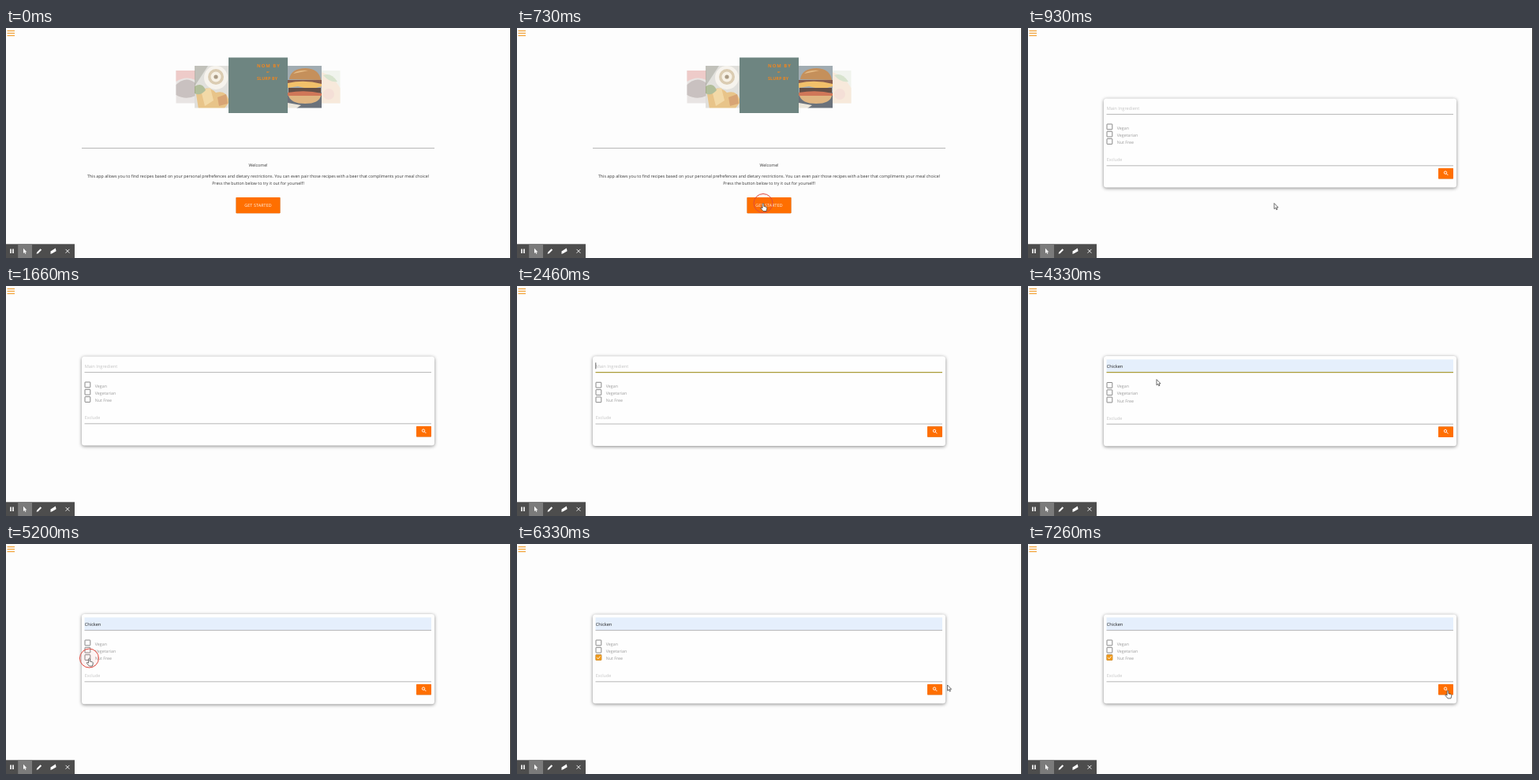
Write an HTML page that moves like this. It is 640 by 292 pixels and loops after 8000 ms.

```html
<!DOCTYPE html>
<html lang="en">
<head>
<meta charset="utf-8">
<title>Recipe finder</title>
<style>
html, body { margin: 0; width: 100%; height: 100%; overflow: hidden; background: #fdfdfd; }
svg { display: block; width: 100vw; height: 100vh; }
text { font: 5.295px "Open Sans", "Noto Sans", sans-serif; fill: #333; text-rendering: geometricPrecision; }
.mid { text-anchor: middle; }
.grey { fill: #999; }
.hint { fill: #c4c4c4; font-size: 5.65px; }
.btn { fill: #ff6f00; filter: drop-shadow(0 .6px .6px #0005); }
.card { fill: #fefefe; filter: drop-shadow(0 1.2px 2px #0007); }
.box { fill: #fefefe; stroke: #6a6a6a; stroke-width: .8; }
.brand { font-weight: 700; fill: #f2861e; }
</style>
</head>
<body>
<svg viewBox="0 0 640 292" preserveAspectRatio="none">
  <defs>
    <clipPath id="cl"><rect x="239" y="48" width="43" height="53.5"/></clipPath>
    <clipPath id="cr"><rect x="357" y="48" width="43" height="53.5"/></clipPath>
  </defs>
  <rect width="640" height="292" fill="#fdfdfd"/>
  <path d="M1.5 3.6H11M1.5 6.6H11M1.5 9.6H11" stroke="#f2a33a" stroke-width="1.2"/>

  <g id="home">
    <g opacity=".4">
      <rect x="215.5" y="54" width="24" height="41.5" fill="#c9c1bd"/>
      <path d="M215.5 54H240V66Q228 60 215.5 68Z" fill="#d8837c"/>
      <path d="M215.5 72Q228 60 240 70V86Q228 92 215.5 85Z" fill="#7d6a66"/>
      <rect x="400" y="54" width="23.5" height="41.5" fill="#dfe5d6"/>
      <path d="M400 56Q414 60 423.5 76V95.5H400Z" fill="#f0cdaa"/>
      <path d="M402 60Q412 56 420 68Q411 70 402 60Z" fill="#9fbd88"/>
      <circle cx="409" cy="84" r="7" fill="#e9b3a0"/>
    </g>
    <g opacity=".72" clip-path="url(#cl)">
      <rect x="239" y="48" width="43" height="54" fill="#d6d5cf"/>
      <path d="M239 48H256L239 74Z" fill="#a9aaa0"/>
      <circle cx="266" cy="63" r="15" fill="#f3efe6"/>
      <circle cx="266" cy="62" r="10" fill="#cdb995"/>
      <circle cx="266" cy="62" r="6.5" fill="#f4ecdc"/>
      <circle cx="266" cy="62" r="2.6" fill="#8a7556"/>
      <path d="M241 84Q254 70 266 82Q280 78 283 94L276 103H244Z" fill="#e0ad5c"/>
      <path d="M247 79L259 76L263 92L252 99Z" fill="#eecb86"/>
      <path d="M239 74Q249 68 253 79Q246 87 239 83Z" fill="#93a573"/>
      <path d="M268 88L279 84L281 96L270 99Z" fill="#c98240"/>
    </g>
    <g opacity=".82" clip-path="url(#cr)">
      <rect x="357" y="48" width="43" height="54" fill="#8d9aa2"/>
      <rect x="357" y="82" width="43" height="20" fill="#4b545e"/>
      <path d="M359 65Q361 51 380 51Q397 52 399 66Z" fill="#b97838"/>
      <path d="M364 58Q370 53 383 54Q374 56 364 58Z" fill="#e0ac69"/>
      <path d="M357 66H400V71H357Z" fill="#6d3b29"/>
      <path d="M357 70Q378 65 400 71V74L386 78L370 74L357 76Z" fill="#f0b24a"/>
      <path d="M358 76H399V82H358Z" fill="#43291f"/>
      <path d="M357 82Q380 78 400 83V86H357Z" fill="#c65934"/>
      <path d="M358 86H399Q397 96 379 96Q361 96 358 86Z" fill="#d9a566"/>
      <path d="M357 95L374 98L368 102H357Z" fill="#e7e1d4"/>
    </g>
    <rect x="282" y="37.5" width="75" height="70.5" fill="#6e8581"/>
    <text class="brand" x="318" y="50.3" style="font-size:5.8px;letter-spacing:1px">NOM BY</text>
    <text class="brand mid" x="332" y="57.4" style="font-size:3.6px">or</text>
    <text class="brand" x="318" y="66.3" style="font-size:5.4px;letter-spacing:.1px">SLURP BY</text>

    <path d="M96 152.6H543" stroke="#b4b4b4"/>
    <text class="mid" x="319.5" y="176.3">Welcome!</text>
    <text class="mid" x="319.5" y="190.4">This app allows you to find recipes based on your personal prefrefences and dietary restrictions. You can even pair those recipes with a beer that compliments your meal choice!</text>
    <text class="mid" x="319.5" y="198.7">Press the button below to try it out for yourself!</text>
    <rect class="btn" x="291.5" y="215" width="56" height="20.2" rx=".8"/>
    <text class="mid" x="319.5" y="227.1" style="fill:#fff;letter-spacing:.15px">GET STARTED</text>
  </g>

  <g id="form">
    <rect id="card" class="card" x="96" width="447" rx="3.5"/>
    <rect id="fill" x="99.5" y="93.3" width="439.5" height="16.2" fill="#e5effc"/>
    <path id="line" d="M99.5 109.6H539"/>
    <text id="hint" class="hint" x="99.7" y="103.6">Main Ingredient</text>
    <text id="value" x="99.7" y="103.7" style="fill:#222">Chicken</text>
    <path id="caret" d="M0 97.3V105.3" stroke="#222" stroke-width=".7"/>
    <g id="body">
      <g id="checks"></g>
      <g id="tick">
        <rect x="99.6" y="140.4" width="7.6" height="7.4" rx=".7" fill="#f09a1c"/>
        <path id="mark" d="M101.3 144.2L102.8 145.8L105.6 142.5" fill="none" stroke="#fff" stroke-width=".9"/>
      </g>
      <text class="hint" x="99.7" y="169" style="font-size:5.5px">Exclude</text>
      <path d="M99.5 174.8H539" stroke="#a5a5a5" stroke-width=".8"/>
      <rect class="btn" x="520" y="178" width="19" height="13.4" rx=".7"/>
      <g fill="none" stroke="#fff" stroke-width=".9">
        <circle cx="529" cy="183.6" r="1.7"/>
        <path d="M530.3 184.9L532.4 187"/>
      </g>
    </g>
  </g>

  <rect x="639" width="1" height="292" fill="#222"/>
  <g id="bar">
    <rect y="274.3" width="87" height="17.7" fill="#4d4d4d"/>
    <rect x="15.2" y="274.3" width="17.8" height="17.7" fill="#7b7b7b"/>
    <g fill="#fff">
      <path d="M5.2 280.6H6.8V286H5.2ZM8.2 280.6H9.8V286H8.2Z"/>
      <path d="M22 279.8V286L23.5 284.8L24.5 287L25.4 286.6L24.4 284.5H26.4Z"/>
      <path d="M38.6 286.8L39.2 284.7L43.6 280.3L45.1 281.8L40.7 286.2Z"/>
      <path d="M56.5 286.9V283.4L62.8 279.6L63.6 283.2L58.8 286Z"/>
    </g>
    <path d="M75.6 280.9L80.4 285.7M80.4 280.9L75.6 285.7" stroke="#fff" stroke-width=".9"/>
  </g>

  <circle id="ring" fill="#e533330d" stroke="#e04a40" stroke-width="1"/>
  <g id="cursor" fill="#fff" stroke="#333" stroke-width=".7" stroke-linejoin="round">
    <path id="arrow" d="M0 0V7.2L1.7 5.7L2.8 8.2L4 7.7L2.9 5.3H5.1Z"/>
    <path id="hand" d="M-.9 .8Q0 -.6 .9 .8V4L4 4.8Q5 5.2 4.7 7L4 10H0L-3 6.5Q-3.4 5.2 -2 5.4L-.9 6.2Z"/>
  </g>
</svg>
<script>
const LOOP = 8000;
const $ = id => document.getElementById(id);
const show = (id, on) => $(id).setAttribute('display', on ? 'inline' : 'none');
const set = (id, attrs) => { for (const k in attrs) $(id).setAttribute(k, attrs[k]); };
const ramp = (t, a, b) => Math.min(1, Math.max(0, (t - a) / (b - a)));
const ease = u => u * u * (3 - 2 * u);
const within = (t, a, b) => t >= a && t < b;

$('checks').innerHTML = ['Vegan', 'Vegetarian', 'Nut Free'].map((label, i) => {
  const y = 122 + i * 9.3;
  return `<rect class="box" x="100" y="${y}" width="6.8" height="6.8" rx=".5"/>
    <text class="grey" x="112.8" y="${y + 6.6}">${label}</text>`;
}).join('');

// Pointer moves: start, end, from x, from y, to x, to y, sag
const moves = [
  [60, 400, 362, 204, 312, 222.5, 0],
  [1400, 1660, 312, 222.5, 197, 103, 0],
  [4000, 4800, 197, 103, 105.5, 145, 0],
  [5930, 6330, 105.5, 145, 545.5, 179, 24],
  [6330, 6660, 545.5, 179, 532, 186, 0]
];

function pointer(t) {
  const m = moves.filter(m => t >= m[0]).pop() || moves[0];
  const u = ease(ramp(t, m[0], m[1]));
  return [m[2] + (m[4] - m[2]) * u, m[3] + (m[5] - m[3]) * u + m[6] * Math.sin(Math.PI * u)];
}

function drawPointer(t, home) {
  const [x, y] = pointer(t);
  const hand = home
    ? x > 291 && x < 348 && y > 215
    : (x < 140 && y > 122) || (x > 520 && x < 539 && y > 178 && y < 192);
  const typing = !home && x < 539 && y < 110;
  show('cursor', t >= 60 && !typing);
  show('arrow', !hand);
  show('hand', hand);
  set('cursor', { transform: `translate(${x} ${y})` });

  const press = within(t, 660, 930) ? 660 : within(t, 5060, 5400) ? 5060 : 0;
  show('ring', press);
  if (press) set('ring', { cx: x, cy: y, r: 8 + 4 * ramp(t, press, press + 70) });
}

function drawForm(t) {
  const grow = ramp(t, 2260, 2600) * (1 - ramp(t, 5260, 5460));
  const shift = t < 5060 ? grow * .5 : 0;
  const focus = within(t, 2260, 5060);
  const filled = t >= 3000;
  const chosen = t >= 3630;

  set('card', { y: 89.6 - grow * .6, height: 113 + grow * 1.3 });
  set('body', { transform: `translate(0 ${shift})` });
  set('line', { stroke: focus ? '#aa9c38' : '#a5a5a5', 'stroke-width': focus ? 1.4 : .8 });
  show('fill', filled);
  show('hint', !filled);
  show('value', filled);
  $('value').style.fontSize = chosen ? '5.65px' : '4.9px';

  const blink = chosen ? (t - 3660) % 1000 < 500 : !within(t, 2860, 3000);
  show('caret', focus && blink);
  set('caret', { transform: `translate(${chosen ? 121.2 : 99.8} 0)` });

  show('tick', t >= 5400);
  set('tick', { opacity: ramp(t, 5400, 5500) });
  set('mark', { opacity: ramp(t, 5460, 5600) });
}

function render(t) {
  const home = t < 930;
  show('home', home);
  show('form', !home);
  if (!home) drawForm(t);
  drawPointer(t, home);
}

function tick() {
  render(performance.now() % LOOP);
  requestAnimationFrame(tick);
}
tick();
</script>
</body>
</html>
```
